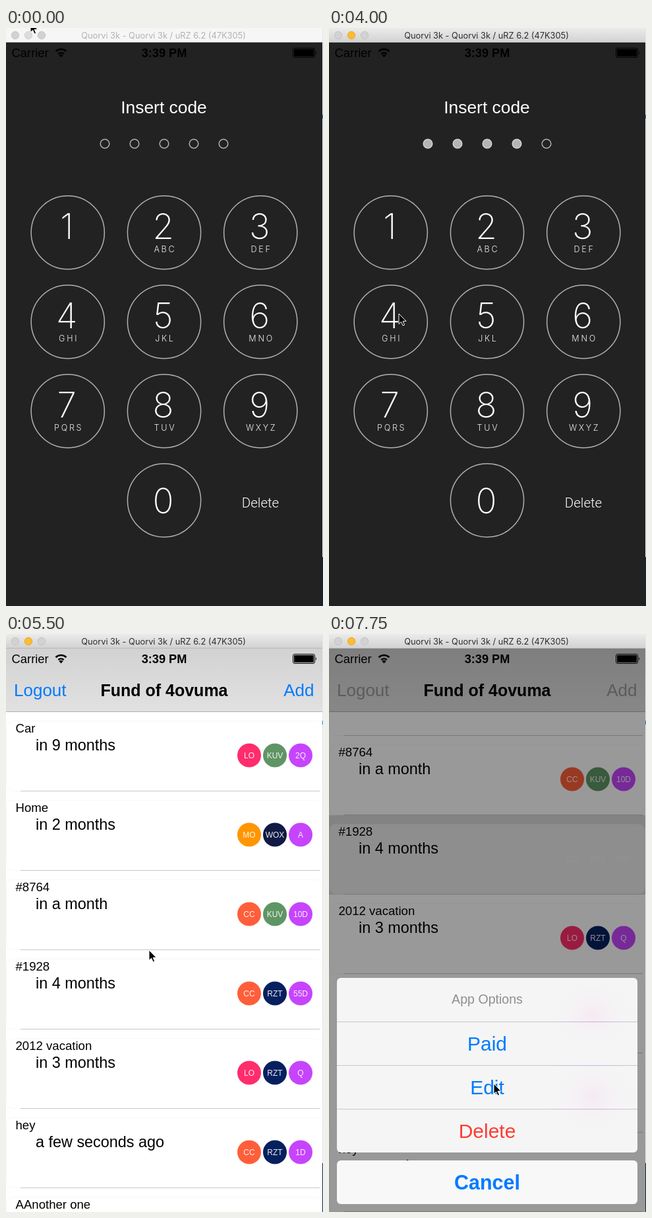
An HTML page that plays this animation: 481 px wide and 874 px high, repeating every 8000 ms.

```html
<!DOCTYPE html>
<html lang="en">
<head>
<meta charset="utf-8">
<title>Passcode and list</title>
<style>
html, body { margin: 0; width: 100%; height: 100%; overflow: hidden; background: #222; }
svg { display: block; width: 481px; height: 874px; }
text { font-family: "Liberation Sans", Arial, sans-serif; white-space: pre; }
.bar text { font-family: Inter, "Open Sans", sans-serif; font-size: 12.8px; fill: #2c2c2c; }
.idle text { fill: #b2b2b2; }
.idle .amber { fill: #dcdcdc; stroke: #cacaca; }
.idle .chrome { fill: #f6f6f6; }
.num { font-family: Inter, Roboto, sans-serif; font-weight: 200; font-size: 53px; fill: #fff; }
.abc { font-family: Inter, Roboto, sans-serif; font-weight: 300; font-size: 12.6px; letter-spacing: 2.7px; fill: #eee; }
.erase { font-family: Roboto, Inter, sans-serif; font-weight: 300; font-size: 20.5px; fill: #fff; }
.ring { fill: #b4b4b4; fill-opacity: 0; stroke: #b0b0b0; stroke-width: 1.5; }
.ring.on { fill-opacity: 1; stroke: #d2d2d2; }
.cell { fill: #fff; }
.card { fill: #fff; stroke: #f8f8f8; }
.tag { font-size: 12px; fill: #fff; fill-opacity: .9; }
.picked .cell { fill: #d9d9d9; }
.picked .card { fill: #ececec; stroke: #e3e3e3; }
.picked .disc { opacity: 0; }
.picked .tag { fill-opacity: .4; }
.link { fill: #007aff; font-size: 26px; }
.muted .link { fill: #989898; }
</style>
</head>
<body>
<svg id="stage" viewBox="0 0 481 874" xmlns="http://www.w3.org/2000/svg">
  <defs>
    <linearGradient id="chrome" x2="0" y2="1">
      <stop stop-color="#ebebeb"/><stop offset="1" stop-color="#d1d1d1"/>
    </linearGradient>
    <linearGradient id="nav" x2="0" y2="1">
      <stop stop-color="#d2d2d2"/><stop offset="1" stop-color="#e1e1e1"/>
    </linearGradient>
    <linearGradient id="sheen">
      <stop stop-color="#fff" stop-opacity=".15"/><stop offset=".7" stop-color="#fff" stop-opacity=".5"/>
    </linearGradient>
    <radialGradient id="glow">
      <stop stop-color="#f5eaf3"/><stop offset="1" stop-color="#f5f5f5" stop-opacity="0"/>
    </radialGradient>
    <linearGradient id="rule">
      <stop offset=".65" stop-color="#c9c9cb"/><stop offset=".85" stop-color="#cbb0dc"/><stop offset="1" stop-color="#cdc6d0"/>
    </linearGradient>
  </defs>
  <rect width="481" height="874" fill="#222"/>
  <g id="pad"></g>
  <rect id="shade" y="22" width="480" height="852" opacity="0"/>
  <g id="list"><rect y="118" width="480" height="756" fill="#fff"/><g id="rows"></g></g>
  <rect id="thumb" x="472" width="4" rx="2" fill="#8c8c8c"/>
  <g id="top">
    <rect y="22" width="480" height="96" fill="url(#nav)"/>
    <rect id="gloss" y="22" width="480" height="96" fill="url(#sheen)"/>
    <path d="M0 117.500H480" stroke="#b0b0b0"/>
  </g>
  <g id="status">
    <path d="M75.500 35.200a11.500 11.500 0 0 1 16 0M79.300 39a6.500 6.500 0 0 1 8.400 0" fill="none" stroke="#000" stroke-width="2.6"/>
    <path d="M83.500 44.500l-3.200-3.400a4.600 4.600 0 0 1 6.400 0z"/>
    <rect x="435.5" y="30.5" width="33" height="14" rx="2.5" fill="none" stroke="#000"/>
    <rect x="437" y="32" width="30" height="11" rx="1"/>
    <path d="M470 35q2 2.500 0 5z"/>
  </g>
  <g id="sheet">
    <rect y="22" width="480" height="852" opacity=".4"/>
    <rect x="12" y="520" width="456" height="264" rx="6" fill="#f5f5f5"/>
    <ellipse cx="400" cy="576" rx="68" ry="54" fill="url(#glow)"/>
    <ellipse cx="400" cy="698" rx="68" ry="58" fill="url(#glow)"/>
    <path d="M12 586h456v1h-456zM12 652h456v1h-456zM12 718h456v1h-456z" fill="url(#rule)"/>
    <rect x="12" y="796" width="456" height="66" rx="6" fill="#f8f8f8"/>
  </g>
  <g id="bar" class="bar">
    <rect class="chrome" width="480" height="22" fill="url(#chrome)"/>
    <path d="M0 21.500H480" stroke="#b9b9b9"/>
  </g>
  <path d="M480.500 0V800" stroke="#e4e6ea"/>
  <path d="M480.500 800V874" stroke="#0b2448"/>
  <path d="M480.500 131V137" stroke="#2a7bd0"/>
  <path id="cursor" d="M0 0V15.500L3.600 12.200L6.200 18L8.600 17L6.200 11.300H11Z" fill="#000" stroke="#fff"/>
</svg>
<script>
const LOOP = 8000, STEP = 250;
const $ = id => document.getElementById(id);

function add(parent, tag, attrs, label) {
  const el = document.createElementNS('http://www.w3.org/2000/svg', tag);
  for (const k in attrs) el.setAttribute(k, attrs[k]);
  if (label) el.textContent = label;
  return parent.appendChild(el);
}
const write = (parent, label, x, y, attrs) => add(parent, 'text', { x, y, ...attrs }, label);
const mid = { 'text-anchor': 'middle' };

// Keypad
const pad = $('pad');
write(pad, 'Insert code', 239.5, 129, { ...mid, fill: '#fff', 'font-size': 26.4 });
const dots = [0, 1, 2, 3, 4].map(i =>
  add(pad, 'circle', { class: 'ring', cx: 150 + 45 * i, cy: 175, r: 6.8 }));
const keys = {};
['1', '2ABC', '3DEF', '4GHI', '5JKL', '6MNO', '7PQRS', '8TUV', '9WXYZ', '0'].forEach((name, i) => {
  const col = name === '0' ? 1 : i % 3;
  const x = 93.75 + 146.25 * col, y = 309.25 + 135 * Math.floor(i / 3);
  keys[name[0]] = add(pad, 'circle', { class: 'ring', cx: x, cy: y, r: 55.6 });
  write(pad, name[0], x - 1.5, y + (name === '0' ? 24.5 : 10), { ...mid, class: 'num' })
    .setAttribute('y', y + (name === '0' ? 20 : 10));
  write(pad, name.slice(1), x + 1.4, y + 29.8, { ...mid, class: 'abc' });
});
write(pad, 'Delete', 386, 725, { ...mid, class: 'erase' });

// List
const tints = {
  LO: '#ff2d6b', MO: '#ff9500', CC: '#ff5e3a', KUV: '#5f9565', WOX: '#101a44', RZT: '#05205e'
};
const rows = [
  ['Car', 'in 9 months', 'LO KUV 2Q'],
  ['Home', 'in 2 months', 'MO WOX A'],
  ['#8764', 'in a month', 'CC KUV 10D'],
  ['#1928', 'in 4 months', 'CC RZT 55D'],
  ['2012 vacation', 'in 3 months', 'LO RZT Q'],
  ['hey', 'a few seconds ago', 'CC RZT 1D'],
  ['AAnother one', 'a few seconds ago', 'LO WOX 10D'],
  ['hey', 'a month ago', 'CC WOX 1D']
].map(([name, due, tags], i) => {
  const row = add($('rows'), 'g', { transform: `translate(0 ${118 + 120 * i})` });
  add(row, 'rect', { class: 'cell', width: 480, height: 120 });
  add(row, 'rect', { class: 'card', x: .5, y: 13.5, width: 479, height: 106, rx: 10 });
  add(row, 'path', { d: 'M22 119.5H476', stroke: '#c8c8c8' });
  write(row, name, 14.5, 31, { 'font-size': 18.6 });
  write(row, due, 45, 58, { 'font-size': 23.4 });
  tags.split(' ').forEach((tag, j) => {
    const cx = 369 + 39 * j;
    add(row, 'circle', { class: 'disc', cx, cy: 65.5, r: 18, fill: tints[tag] || '#c644fc' });
    write(row, tag, cx, 70, { ...mid, class: 'tag' });
  });
  return row;
});

// Bars and sheet
const nav = $('top'), status = $('status'), sheet = $('sheet'), bar = $('bar');
write(nav, 'Logout', 12, 94, { class: 'link' });
write(nav, 'Fund of 4ovuma', 240, 94, { ...mid, 'font-weight': 700, 'font-size': 25 });
write(nav, 'Add', 467.5, 94, { class: 'link', 'text-anchor': 'end' });
write(status, 'Carrier', 8.5, 44, { 'font-size': 18.4 });
write(status, '3:39 PM', 240, 44, { ...mid, 'font-weight': 700, 'font-size': 18.2 });
[
  ['App Options', 559, 19.6, '#8f8f8f'], ['Paid', 630, 30, '#007aff'], ['Edit', 696, 30, '#007aff'],
  ['Delete', 762, 30, '#ff3b30'], ['Cancel', 840, 30.5, '#007aff', 700]
].forEach(([label, y, size, fill, weight = 400]) =>
  write(sheet, label, 240, y, { ...mid, fill, 'font-size': size, 'font-weight': weight }));
[14, 34, 54].forEach((cx, i) => add(bar, 'circle', {
  class: i === 1 ? 'amber' : '', cx, cy: 11, r: 5.7,
  fill: i === 1 ? '#fdbc2e' : '#d2d2d2', stroke: i === 1 ? '#e0a020' : '#bdbdbd', 'stroke-width': .8
}));
write(bar, 'Quorvi 3k - Quorvi 3k / uRZ 6.2 (47K305)', 239, 16, mid);

// Motion: [time, ...values], linear between stops
const path = [
  [0, 37, -9], [250, 45, 60], [750, 78, 330], [1250, 102, 484], [1750, 104, 450], [2000, 105, 440],
  [2250, 205, 352], [2750, 226, 335], [3250, 226, 440], [3750, 106, 432], [4500, 106, 432],
  [5000, 165, 470], [5500, 217, 478], [5750, 224, 468], [6250, 256, 303], [6500, 240, 325],
  [7000, 165, 378], [7500, 168, 390], [7750, 250, 680]
];
const slide = [[4250, 0], [4500, .6167], [4750, .97], [5000, 1]];
const scroll = [[5500, 0], [5750, 18], [6000, 130], [6250, 214], [6500, 206], [6750, 204]];
const filled = [1750, 2750, 3250, 3750, 4250];

function at(stops, t) {
  const i = stops.findIndex(s => s[0] > t);
  if (i < 0) return stops[stops.length - 1].slice(1);
  if (i === 0) return stops[0].slice(1);
  const a = stops[i - 1], b = stops[i], k = (t - a[0]) / (b[0] - a[0]);
  return a.slice(1).map((v, j) => v + (b[j + 1] - v) * k);
}
const move = (el, x, y) => el.setAttribute('transform', `translate(${x} ${y})`);
const show = (el, on) => el.setAttribute('visibility', on ? 'visible' : 'hidden');

function draw(t) {
  const [x, y] = at(path, t), [p] = at(slide, t), [off] = at(scroll, t);
  move($('cursor'), x, y);
  bar.classList.toggle('idle', t < 1500);
  dots.forEach((d, i) => d.classList.toggle('on', t >= filled[i]));
  keys[4].classList.toggle('on', t === 1750 || t >= 4250);

  move(pad, -144 * p, 0);
  $('shade').setAttribute('opacity', .1 * p);
  move($('list'), Math.round(480 * (1 - p)), 0);
  move($('rows'), 0, -off);
  show(nav, t >= 4500);
  show($('gloss'), t >= 4500 && t < 5000);

  const over = Math.max(0, off - 204), head = 122 + 159 * Math.min(off, 204) / 204 + over;
  $('thumb').setAttribute('y', head);
  $('thumb').setAttribute('height', 589 - over);
  show($('thumb'), t >= 5750 && t < 7000);
  $('thumb').setAttribute('opacity', t < 6750 ? 1 : .4);

  rows[3].classList.toggle('picked', t >= 7000);
  nav.classList.toggle('muted', t >= 7500);
  show(sheet, t >= 7500);
}

const start = performance.now();
function tick() {
  const t = (performance.now() - start) % LOOP;
  draw(Math.floor(t / STEP) * STEP);
  requestAnimationFrame(tick);
}
tick();
</script>
</body>
</html>
```
